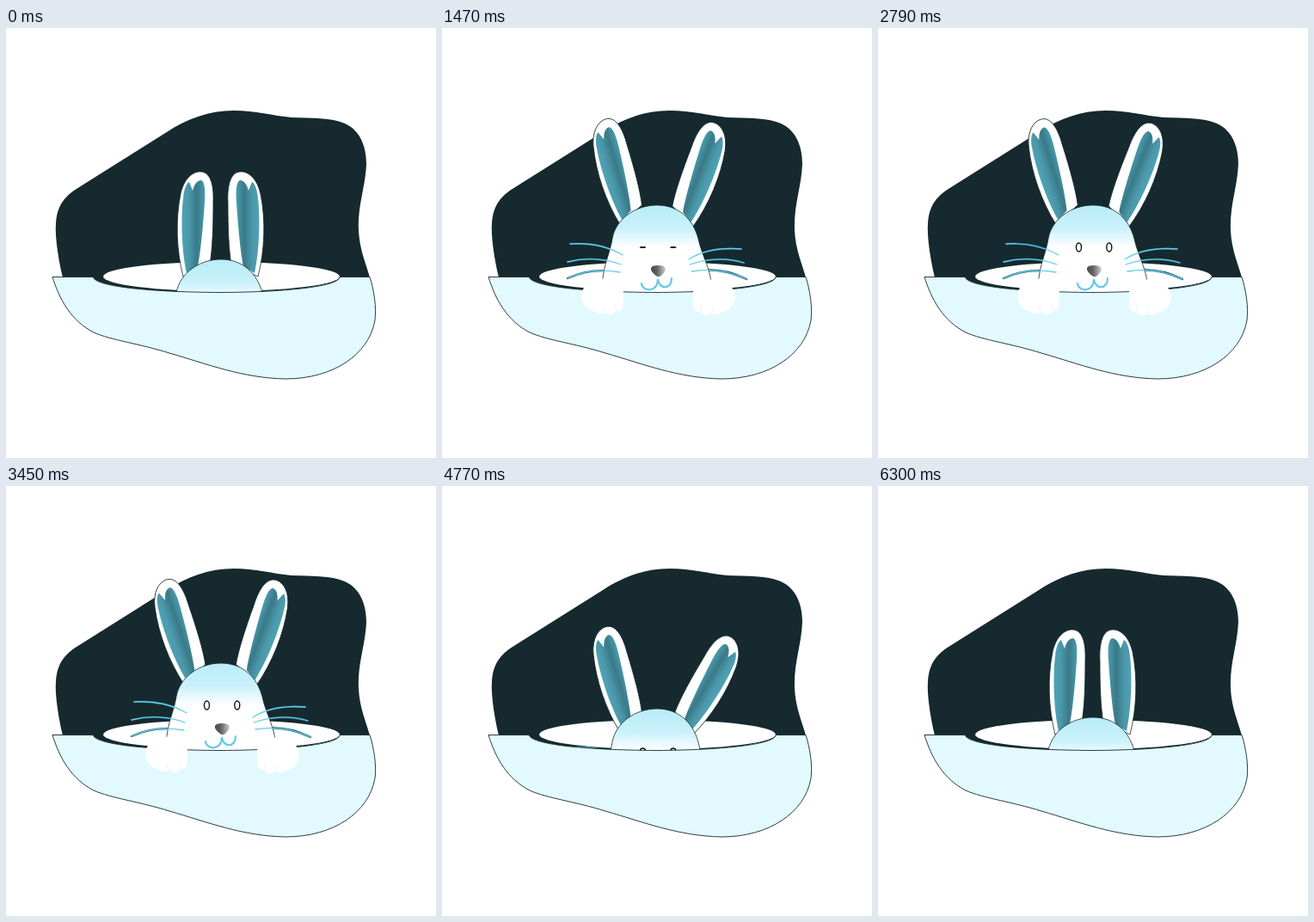
An HTML page for the animation above (6330 ms loop, 500 px wide and 500 px high).

```html
<!DOCTYPE html>
<html lang="en">
<head>
<meta charset="utf-8">
<title>Rabbit in a snow hole</title>
<style>
  html, body { margin: 0; width: 100%; height: 100%; overflow: hidden; background: #fff; }
  svg { display: block; width: 100vw; height: 100vh; }
</style>
</head>
<body>
<svg viewBox="0 0 500 500">
  <defs>
    <linearGradient id="fur" x2="0" y2="1">
      <stop stop-color="#b9ecf8"/>
      <stop offset=".25" stop-color="#c8f1fb"/>
      <stop offset=".48" stop-color="#fff"/>
    </linearGradient>
    <linearGradient id="teal">
      <stop stop-color="#4fa3b6"/>
      <stop offset=".3" stop-color="#4a98aa"/>
      <stop offset=".65" stop-color="#3a7988"/>
      <stop offset="1" stop-color="#489cae"/>
    </linearGradient>
    <linearGradient id="noseFill">
      <stop stop-color="#4a4a4a"/>
      <stop offset=".4" stop-color="#606060"/>
      <stop offset="1" stop-color="#d0d0d0"/>
    </linearGradient>
    <g id="ear">
      <path fill="#fff" stroke="#15292e" stroke-width=".8" d="M206 226C198 195 197 160 203 130C207 112 217 104 226 104C237 104 242 118 241 140C241 170 240 195 237 212Z"/>
      <path fill="url(#teal)" d="M210 222C203 190 204 150 206 135C207 122 211 117 213 116L217 126C219 118 223 114 227 114C231 116 232 125 231 140C229 170 226 200 223 214Z"/>
    </g>
    <g id="whiskers" fill="none" stroke-linecap="round">
      <path d="M149 251Q185 249 210 264M146 272Q178 264 208 275M146 291Q174 278 207 284"/>
      <path d="M287 269Q310 254 348 257M288 275Q320 264 351 273M290 283Q324 277 354 292"/>
    </g>
    <g id="paw">
      <path fill="#fff" d="M168 299C175 290 203 289 209 296C212 305 211 318 210 326Q207 330 203 329Q200 334 194 333L190 331Q184 334 178 330Q163 326 162 312Q162 304 168 299Z"/>
      <path fill="none" stroke="#e9f3f6" d="M190 331Q187 327 188 323M203 329Q201 325 202 321"/>
    </g>
  </defs>

  <path fill="#15292e" d="M66 290C60 265 57 240 58 228C59 205 70 195 82 187L187 121C210 106 235 96 265 96C290 96 310 102 332 104C355 105 378 104 394 111C412 119 419 138 419 158C418 185 409 205 410 235C411 258 419 275 423 290Z"/>
  <ellipse cx="245" cy="289" rx="144" ry="19" fill="#15292e"/>
  <ellipse cx="250.5" cy="289" rx="137.5" ry="17" fill="#fff"/>

  <g id="rabbit">
    <use id="earL" href="#ear"/>
    <g transform="translate(499) scale(-1 1)"><use id="earR" href="#ear"/></g>
    <use class="whisk" href="#whiskers" stroke="#17566a" stroke-width="2.4"/>
    <path fill="url(#fur)" stroke="#15292e" stroke-width=".8" d="M187 309C184 282 195 265 198 245C202 222 225 206 250 206C275 206 292 222 298 245C302 265 315 284 314 309Z"/>
    <use class="whisk" href="#whiskers" stroke="#69cde8" stroke-width="1.3"/>
    <g fill="#fff" stroke="#111" stroke-width="1.4">
      <ellipse class="eye" cx="233.5" cy="255" rx="3"/>
      <ellipse class="eye" cx="268.8" cy="255" rx="3"/>
    </g>
    <path fill="url(#noseFill)" d="M243 279Q244 276 251 276Q259 276 260 280Q260 283 256 287Q252 291 249 288Q242 283 243 279Z"/>
    <path fill="none" stroke="#62c9e8" stroke-width="2.2" stroke-linecap="round" d="M232 297C233 307 251 308 251 292C252 304 267 305 267 291"/>
  </g>

  <path fill="#e2f9ff" stroke="#15292e" stroke-width=".9" d="M54 289.5H101C104 300 160 307 250 307.5C330 307 388 300 388 289.5H423C428 305 431 325 429 340C422 380 380 408 325 408C275 407 235 391 190 378C155 367 122 363 102 354C75 340 62 315 54 289.5Z"/>
  <path fill="#fff" id="bib" d="M188 300H314V307.2H188Z" opacity="0"/>
  <g class="paw"><use href="#paw"/></g>
  <g class="paw"><use href="#paw" transform="translate(503 1) scale(-1 1)"/></g>
</svg>
<script>
const LOOP = 6330;
const $ = id => document.getElementById(id);
const all = name => document.querySelectorAll('.' + name);

// Each track is a list of [time, value] keys
const headY = [[0, 63], [150, 63], [800, 0], [4300, 0], [4770, 53], [5100, 60], [5550, 60], [6300, 63]];
const leftTurn = [[0, 0], [870, -18], [2100, -16], [3450, -19], [4770, -17], [5550, -26], [6300, 0]];
const rightTurn = [[0, 0], [870, -18], [2100, -24.6], [3450, -20], [4770, -31], [5550, -23], [6300, 0]];
const leftShift = [[0, 0], [870, 0], [2100, -4], [3450, 0], [4770, 3], [5550, 5], [6300, 0]];
const rightShift = [[0, 0], [3450, 0], [4770, 4], [5550, 5], [6300, 0]];
const whiskerY = [[0, 8], [870, 8], [1200, 0], [6300, 0]];
const eyeOpen = [[0, 5], [760, 5], [870, 1.2], [930, .4], [2250, .4], [2400, 5], [4500, 5], [4770, 3], [6300, 5]];
const pawScale = [[0, 0], [1050, 0], [1350, 1], [4250, 1], [4500, 0]];

function at(keys, t) {
  const i = keys.findIndex(k => k[0] > t);
  if (i < 0) return keys[keys.length - 1][1];
  const [t0, a] = keys[i - 1], [t1, b] = keys[i];
  const p = (t - t0) / (t1 - t0);
  return a + (b - a) * p * p * (3 - 2 * p);
}

const set = (el, value) => el.setAttribute('transform', value);
const turnEar = (el, turn, shift) => set(el, `translate(0 ${shift}) rotate(${turn} 221 225)`);

function draw(now) {
  const t = now % LOOP;
  set($('rabbit'), `translate(0 ${at(headY, t)})`);
  turnEar($('earL'), at(leftTurn, t), at(leftShift, t));
  turnEar($('earR'), at(rightTurn, t), at(rightShift, t));
  all('whisk').forEach(w => set(w, `translate(0 ${at(whiskerY, t)})`));
  all('eye').forEach(e => e.setAttribute('ry', at(eyeOpen, t)));
  const s = at(pawScale, t);
  all('paw').forEach(p => set(p, `translate(0 ${307 * (1 - s)}) scale(1 ${s})`));
  requestAnimationFrame(draw);
}
const start = performance.now();
requestAnimationFrame(() => draw(0));
draw = (step => () => step(performance.now() - start))(draw);
</script>
</body>
</html>
```
